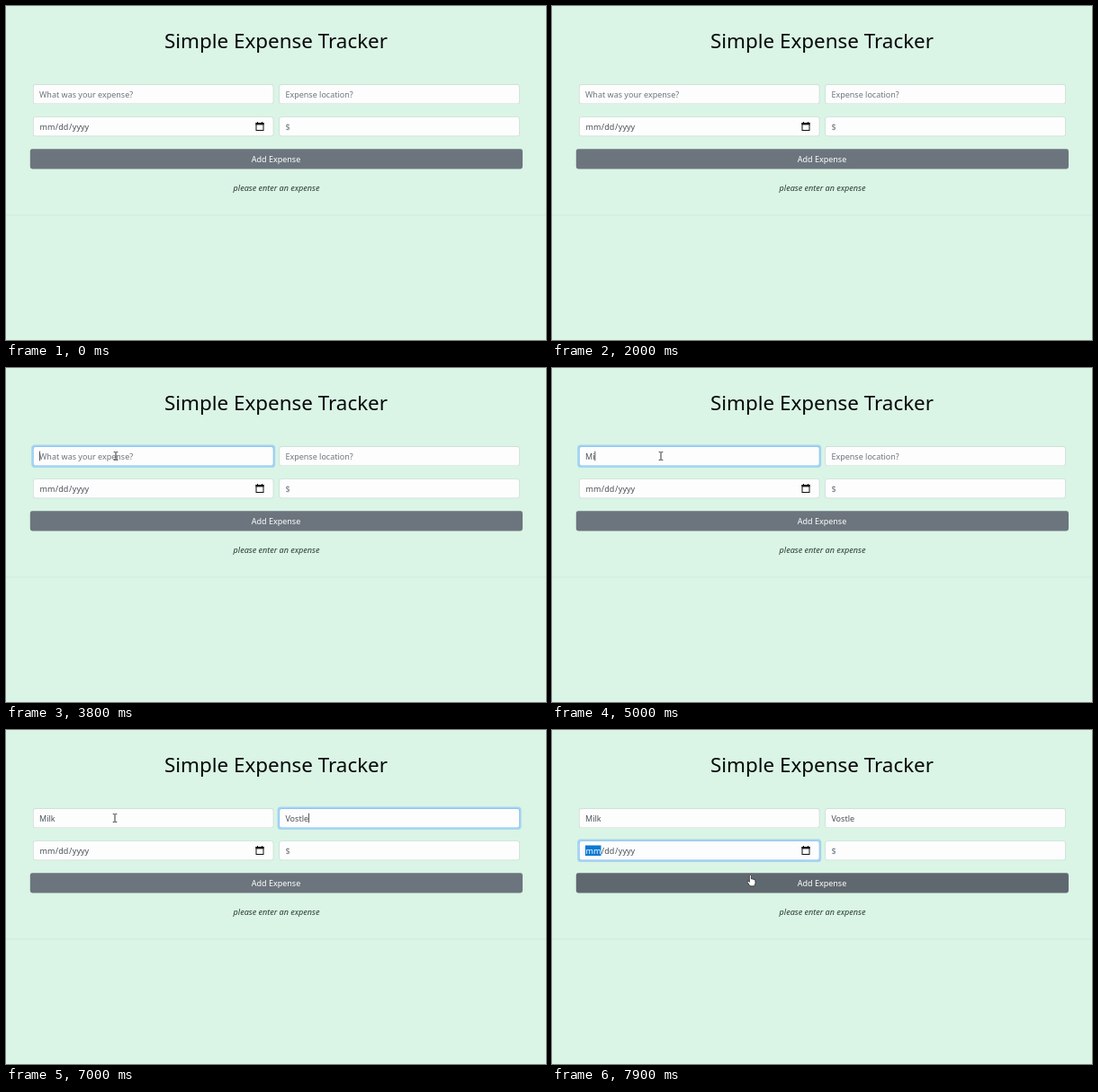
Animation, 600 px wide and 372 px high, one loop 8 s. Source, as an HTML page with a canvas:

```html
<!DOCTYPE html>
<html lang="en">
<head>
<meta charset="utf-8">
<title>Expense form</title>
<style>
  html, body { margin: 0; width: 100%; height: 100%; overflow: hidden; background: #daf4e6; }
  canvas { display: block; width: 600px; height: 372px; }
</style>
</head>
<body>
<canvas id="stage" width="600" height="372"></canvas>
<script>
const ctx = document.getElementById('stage').getContext('2d');
const LOOP = 8000, STEP = 100, FADE = 150;
const FONT = '"Noto Sans", "Open Sans", sans-serif';
const GREY = '#6c757d', INK = '#495057';

const clamp = v => Math.max(0, Math.min(1, v));
const mix = (a, b, k) => a + (b - a) * k;
const ramp = (t, start) => clamp((t - start + 50) / FADE);

// Fields: position, placeholder, typed text with key times, focus interval
const fields = [
  { x: 30, y: 87.3, hint: 'What was your expense?', text: 'Milk',
    keys: [4800, 5000, 5100, 5300], from: 3700, to: 5500 },
  { x: 303.4, y: 87.3, hint: 'Expense location?', text: 'Vostle',
    keys: [6100, 6200, 6300, 6400, 6500, 6700], from: 5500, to: 7100 },
  { x: 30, y: 123.4, date: true, from: 7100, to: LOOP },
  { x: 303.4, y: 123.4, hint: '$', from: LOOP, to: LOOP }
];
const W = 267.4, H = 21.8;

// Pointer path: time, x, y, shape
const path = [
  [3100, 176, 5, arrow],
  [3200, 164, 30, arrow],
  [3300, 148, 60, arrow],
  [3400, 132, 84, arrow],
  [3500, 124, 96, beam],
  [3600, 122, 98, beam],
  [4000, 121, 98, beam],
  [7700, 146, 116, arrow],
  [7800, 202, 153, arrow],
  [7900, 221, 162, hand]
];

function label(str, x, y, size, color, style = '', align = 'left') {
  ctx.font = `${style} ${size}px ${FONT}`;
  ctx.fillStyle = color;
  ctx.textAlign = align;
  ctx.fillText(str, x, y);
}

function box(x, y, w, h, r, color) {
  ctx.fillStyle = color;
  ctx.beginPath();
  ctx.roundRect(x, y, w, h, r);
  ctx.fill();
}

function shape(points, fill, line) {
  ctx.beginPath();
  points.forEach(([x, y]) => ctx.lineTo(x, y));
  ctx.closePath();
  ctx.fillStyle = fill;
  ctx.fill();
  ctx.strokeStyle = line;
  ctx.lineWidth = 0.7;
  ctx.stroke();
}

function arrow() {
  shape([[0, 0], [0, 10.5], [2.5, 8.3], [4.2, 12], [5.8, 11.3], [4.2, 7.6], [7.4, 7.4]], '#fff', '#222');
}

function beam() {
  ctx.fillStyle = '#333';
  ctx.fillRect(-0.5, -4.2, 1, 8.6);
  ctx.fillRect(-2.3, -4.8, 1.9, 0.9);
  ctx.fillRect(0.4, -4.8, 1.9, 0.9);
  ctx.fillRect(-2.3, 4.1, 1.9, 0.9);
  ctx.fillRect(0.4, 4.1, 1.9, 0.9);
}

function hand() {
  shape([[-1.6, 0], [-0.6, -0.7], [0.4, 0], [0.4, 4], [2, 3.8], [2.4, 4.4], [3.6, 4.4],
    [4, 5], [4.8, 5.2], [5, 8.5], [3.8, 11.8], [-1, 11.8], [-3.8, 7.6], [-3.6, 6.3],
    [-2.6, 6.4], [-1.6, 7.4]], '#fff', '#222');
}

function calendar(x, y) {
  ctx.strokeStyle = ctx.fillStyle = '#111';
  ctx.lineWidth = 1;
  ctx.strokeRect(x + 0.5, y + 1.5, 8, 8);
  ctx.fillRect(x, y + 1, 9, 2.4);
  ctx.fillRect(x + 1.5, y, 1, 1.5);
  ctx.fillRect(x + 6.5, y, 1, 1.5);
}

function dateText(y, selected) {
  if (selected) {
    ctx.fillStyle = '#0a79d2';
    ctx.fillRect(37, y - 9.2, 17.5, 11.6);
  }
  label('mm', 37.6, y, 9, selected ? '#fff' : INK);
  label('/', 54.8, y, 9, INK);
  label('dd', 58.3, y, 9, INK);
  label('/', 70, y, 9, INK);
  label('yyyy', 73.8, y, 9, INK);
}

function drawField(f, t) {
  const ring = ramp(t, f.from) * (1 - ramp(t, f.to));
  const focused = t >= f.from && t < f.to;
  const base = f.y + 14.3;

  if (ring > 0) box(f.x - 1.8, f.y - 1.8, W + 3.6, H + 3.6, 3.6, `rgba(0,123,255,${0.25 * ring})`);
  box(f.x, f.y, W, H, 2.4, '#cddad8');
  if (ring > 0) box(f.x, f.y, W, H, 2.4, `rgba(128,189,255,${ring})`);
  box(f.x + 0.7, f.y + 0.7, W - 1.4, H - 1.4, 1.9, '#fdfdfe');

  if (f.date) {
    dateText(base, focused);
    calendar(277.5, f.y + 5.6);
    return;
  }

  const keys = f.keys || [];
  const count = keys.filter(k => k <= t).length;
  const typed = (f.text || '').slice(0, count);
  const x = f.x + 7;
  label(typed || f.hint, x, base, 9, typed ? INK : GREY);

  // Caret blinks from the latest key press or from the focus
  const since = t - (count ? keys[count - 1] : Math.ceil(f.from / 200) * 200);
  if (focused && Math.floor(since / 500) % 2 === 0) {
    ctx.fillStyle = '#333';
    ctx.fillRect(x + ctx.measureText(typed).width, f.y + 5.4, 0.8, 10.6);
  }
}

function drawPointer(t) {
  const spot = path.filter(p => p[0] <= t).pop();
  if (!spot) return;
  ctx.save();
  ctx.translate(spot[1], spot[2]);
  spot[3]();
  ctx.restore();
}

function draw(t) {
  ctx.fillStyle = '#daf4e6';
  ctx.fillRect(0, 0, 600, 372);
  label('Simple Expense Tracker', 300, 47, 22.4, '#060807', '500', 'center');

  fields.forEach(f => drawField(f, t));

  const hover = ramp(t, 7850);
  const tone = [[108, 90], [117, 98], [125, 104]].map(([a, b]) => Math.round(mix(a, b, hover)));
  box(26.8, 159.3, 547.2, 22.2, 2.4, `rgb(${tone})`);
  label('Add Expense', 300, 173.7, 9, '#fff', '500', 'center');
  label('please enter an expense', 300.5, 205.6, 9, '#2b3a35', 'italic', 'center');

  ctx.fillStyle = '#cfe6db';
  ctx.fillRect(0, 232.6, 600, 0.8);

  drawPointer(t);
}

const start = performance.now();
function tick() {
  const t = (performance.now() - start) % LOOP;
  draw(Math.floor(t / STEP) * STEP);
  requestAnimationFrame(tick);
}
tick();
</script>
</body>
</html>
```
